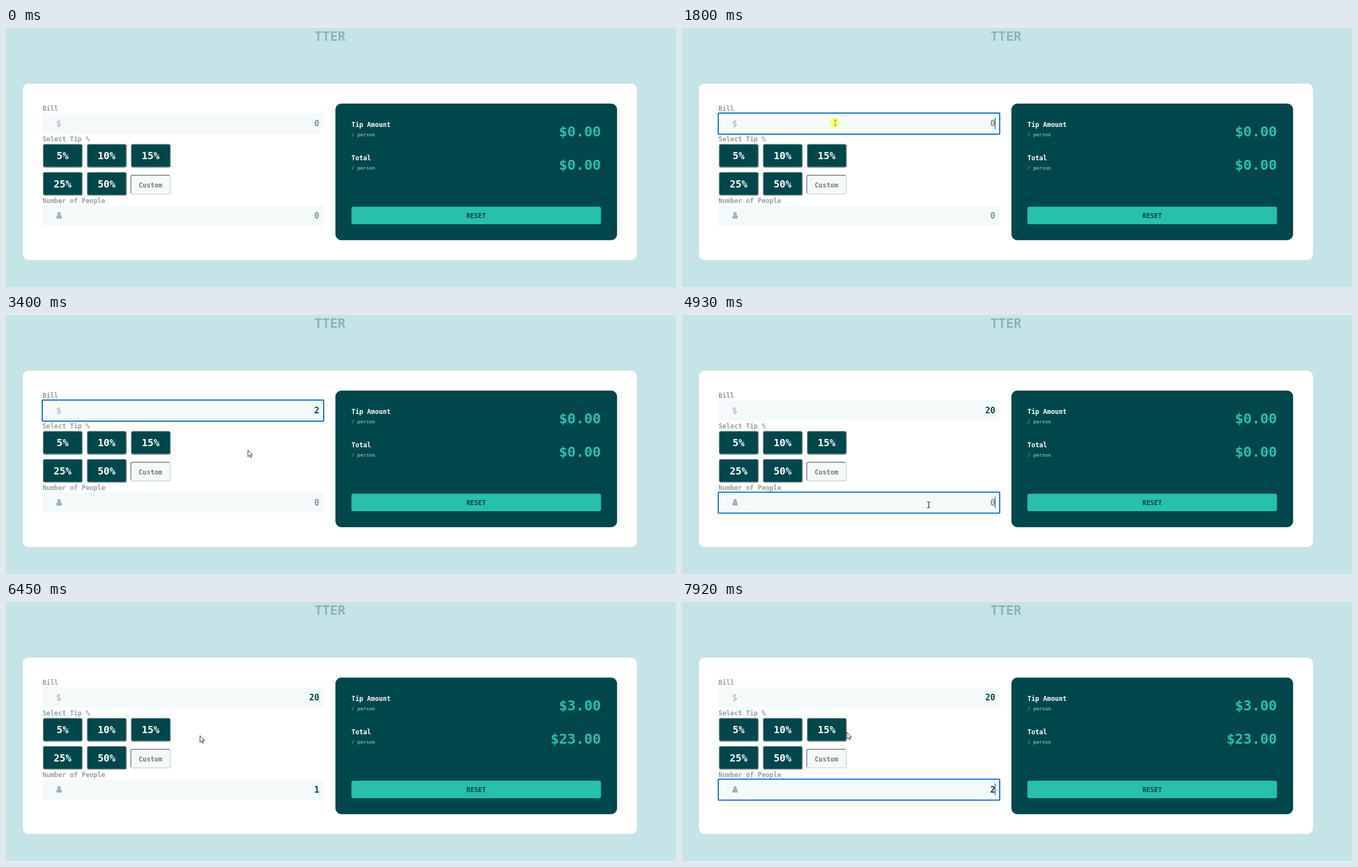
Animation of 1202x466 px, one loop 7990 ms. Source, as an HTML page:

```html
<!DOCTYPE html>
<html lang="en">
<head>
<meta charset="utf-8">
<title>Tip calculator</title>
<style>
html, body { margin: 0; width: 100%; height: 100%; overflow: hidden; background: #c5e4e7; }
svg { display: block; width: 1202px; height: 466px; }
text { font: bold 11.7px "DejaVu Sans Mono", "Liberation Mono", monospace; white-space: pre; }
.label { fill: #959f9b; }
.field { fill: #f4fafa; }
.value { font-size: 15px; text-anchor: end; }
.sub { font-size: 8.8px; fill: #7fa5a7; }
.amount { font-size: 25px; fill: #26c0ab; text-anchor: end; }
.mid { text-anchor: middle; }
.tip rect { fill: #00474b; stroke: #bcc3c3; stroke-width: 1.3; }
.tip path { fill: none; stroke: #858a8a; stroke-width: 1.3; }
.tip text { font-size: 17.7px; fill: #fff; text-anchor: middle; }
.tip.hover rect { fill: #9fe8df; }
.tip.hover text { fill: #00474b; }
.ring { fill: none; stroke: #0b69d2; stroke-width: 2; }
.caret { fill: #26484a; }
.pointer { fill: #fff; stroke: #111; stroke-width: .9; stroke-linejoin: round; }
</style>
</head>
<body>
<svg viewBox="0 0 1202 466">
  <rect width="1202" height="466" fill="#c5e4e7"/>
  <text x="553.5" y="23" style="font-size:23px" fill="#8fb3b7">TTER</text>
  <rect x="29.5" y="99.5" width="1103" height="318.5" rx="11" fill="#fff" stroke="#cbd9da"/>

  <text class="label" x="65.5" y="149">Bill</text>
  <rect class="field" x="65.5" y="153" width="504" height="37.5"/>
  <text x="90" y="177" style="font-size:15px;font-weight:400" fill="#8ab0b5">$</text>
  <text class="value" id="bill" x="562" y="177.3"></text>

  <text class="label" x="65.5" y="204">Select Tip %</text>
  <g id="tips"></g>
  <rect x="224" y="265" width="71" height="33.5" rx="3" fill="#f4fafa" stroke="#cdd1d1" stroke-width="1.4"/>
  <path d="M224 297V268q0-3 3-3h66" fill="none" stroke="#7c8080" stroke-width="1.4"/>
  <text class="mid" x="259.2" y="286.5" fill="#707b7b">Custom</text>

  <text class="label" x="65.5" y="314.5">Number of People</text>
  <rect class="field" x="65.5" y="319" width="504" height="37"/>
  <g fill="#92b5ba">
    <circle cx="95.2" cy="334.2" r="3"/>
    <path d="M92.3 336.5q2.9 2 5.8 0q2 .8 2 4.3q0 2.2-2 2.2h-5.8q-2 0-2-2.2q0-3.5 2-4.3Z"/>
  </g>
  <text class="value" id="people" x="562" y="342.5"></text>

  <rect x="591" y="136" width="505.3" height="245.7" rx="11" fill="#00474b"/>
  <g fill="#fff">
    <text x="619.7" y="178">Tip Amount</text>
    <text x="619.7" y="238">Total</text>
  </g>
  <text class="sub" x="619.7" y="195">/ person</text>
  <text class="sub" x="619.7" y="255">/ person</text>
  <text class="amount" id="tip" x="1067.3" y="194.5"></text>
  <text class="amount" id="total" x="1067.3" y="254.6"></text>
  <rect x="619.7" y="321.5" width="447.8" height="31.5" rx="3.5" fill="#26c0ab"/>
  <text class="mid" x="843.5" y="342" fill="#00474b">RESET</text>

  <g id="billFocus">
    <rect class="ring" x="65" y="153" width="505" height="38" rx="1"/>
    <rect class="caret" id="billCaret" x="561.2" y="161" width="1.2" height="21"/>
  </g>
  <g id="peopleFocus">
    <rect class="ring" x="65" y="318.7" width="505" height="37.8" rx="1"/>
    <rect class="caret" id="peopleCaret" x="561.2" y="326.5" width="1.2" height="21"/>
  </g>

  <g id="cursor">
    <path class="pointer" id="arrow" d="M0 0V12L2.8 9.4L4.6 13.6L6.4 12.8L4.6 8.7H8.4Z"/>
    <path class="pointer" id="hand" d="M-1.2 1.4a1.2 1.2 0 0 1 2.4 0V6q.3-.9 1.2-.9t1.2 1.2q.3-.7 1.2-.7t1.2 1.2q.2-.6 1-.6t1 1V11q0 2-1 3v2H0v-1.6q-1.6-1.6-4-5q-.6-1.4.5-1.6t2.3 2Z"/>
    <path id="beam" d="M-2.8-5h2.1l.7.6l.7-.6h2.1M0-4.4V4.6M-2.8 5.2h2.1l.7-.6l.7.6h2.1" fill="none" stroke="#222" stroke-width="1.1"/>
    <circle id="click" cx="-1.5" r="9" fill="#ff0" fill-opacity=".52"/>
  </g>
</svg>
<script>
const LOOP = 7990, STEP = 200 / 3, ENTER = 120;
const $ = id => document.getElementById(id);
const show = (id, on) => $(id).setAttribute('display', on ? 'inline' : 'none');

const tips = ['5%', '10%', '15%', '25%', '50%'].map((name, i) => {
  const x = 66.4 + i % 3 * 79, y = i < 3 ? 208.9 : 259.3;
  $('tips').insertAdjacentHTML('beforeend', `<g class="tip">
    <rect x="${x}" y="${y}" width="70.5" height="41.6" rx="3"/>
    <path d="M${x + 2} ${y + 41.6}h65.5q3 0 3-3V${y + 2}"/>
    <text x="${x + 35}" y="${y + 27.4}">${name}</text></g>`);
  return { node: $('tips').lastElementChild, x, y };
});

// Pointer moves: start, end, destination
const moves = [
  [120, 730, 804.5, 333], [730, 860, 633, 311], [860, 1130, 285, 225],
  [1130, 1260, 275, 170.5], [2100, 2860, 329, 203], [2860, 3390, 434, 243],
  [4130, 4530, 442.5, 341.5], [4930, 5530, 262, 236], [6190, 6390, 348, 240.5],
  [6450, 6850, 430, 204], [6850, 7320, 535, 338], [7400, 7660, 589, 337],
  [7660, 7920, 295.7, 234.3]
];

// Each action changes part of the form and restarts the caret.
const actions = [
  { at: 0, bill: '', people: '', focus: '', tip: '$0.00', total: '$0.00' },
  { at: 1790, focus: 'bill', click: true },
  { at: 2890, bill: '2' },
  { at: 3720, bill: '20' },
  { at: 4520, focus: 'people', click: true },
  { at: 5080, people: '1' },
  { at: 6050, focus: '', click: true, tip: '$3.00', total: '$23.00' },
  { at: 7320, focus: 'people', click: true },
  { at: 7715, people: '2' }
];

const smooth = k => k * k * (3 - 2 * k);
const within = (px, py, x, y, w, h) => px >= x && px <= x + w && py >= y && py <= y + h;

function pointAt(t) {
  let x = 1031, y = 447;
  for (const [start, end, toX, toY] of moves) {
    const k = smooth(Math.min(1, Math.max(0, (t - start) / (end - start))));
    x += (toX - x) * k;
    y += (toY - y) * k;
  }
  return [x, y];
}

function setField(id, value) {
  $(id).textContent = value || '0';
  $(id).setAttribute('fill', value ? '#00474b' : '#7b999b');
}

function drawForm(t) {
  const done = actions.filter(a => a.at <= t);
  const form = Object.assign({}, ...done);
  const last = done.at(-1), age = t - last.at;
  for (const id of ['bill', 'people']) {
    setField(id, form[id]);
    show(id + 'Focus', form.focus === id);
    show(id + 'Caret', age % 1000 < 500);
  }
  $('tip').textContent = form.tip;
  $('total').textContent = form.total;
  show('click', last.click && age < 130);
}

function drawCursor(t) {
  const [x, y] = pointAt(t);
  let hand = within(x, y, 620, 321.5, 447, 31.5);
  for (const b of tips) {
    const hit = within(x, y, b.x, b.y, 70, 41);
    b.node.classList.toggle('hover', hit);
    hand = hand || hit;
  }
  const beam = within(x, y, 65.5, 153, 504, 37.5) || within(x, y, 65.5, 319, 504, 37)
    || within(x, y, 224, 265, 71, 33);
  $('cursor').setAttribute('transform', `translate(${x} ${y})`);
  show('cursor', t > ENTER);
  show('hand', hand);
  show('beam', beam);
  show('arrow', !hand && !beam);
}

const start = performance.now();
function tick() {
  const now = (performance.now() - start) % LOOP;
  // The screen refreshes fifteen times a second.
  const t = Math.floor((now + 14) / STEP) * STEP;
  drawForm(t);
  drawCursor(t);
  requestAnimationFrame(tick);
}
tick();
</script>
</body>
</html>
```
